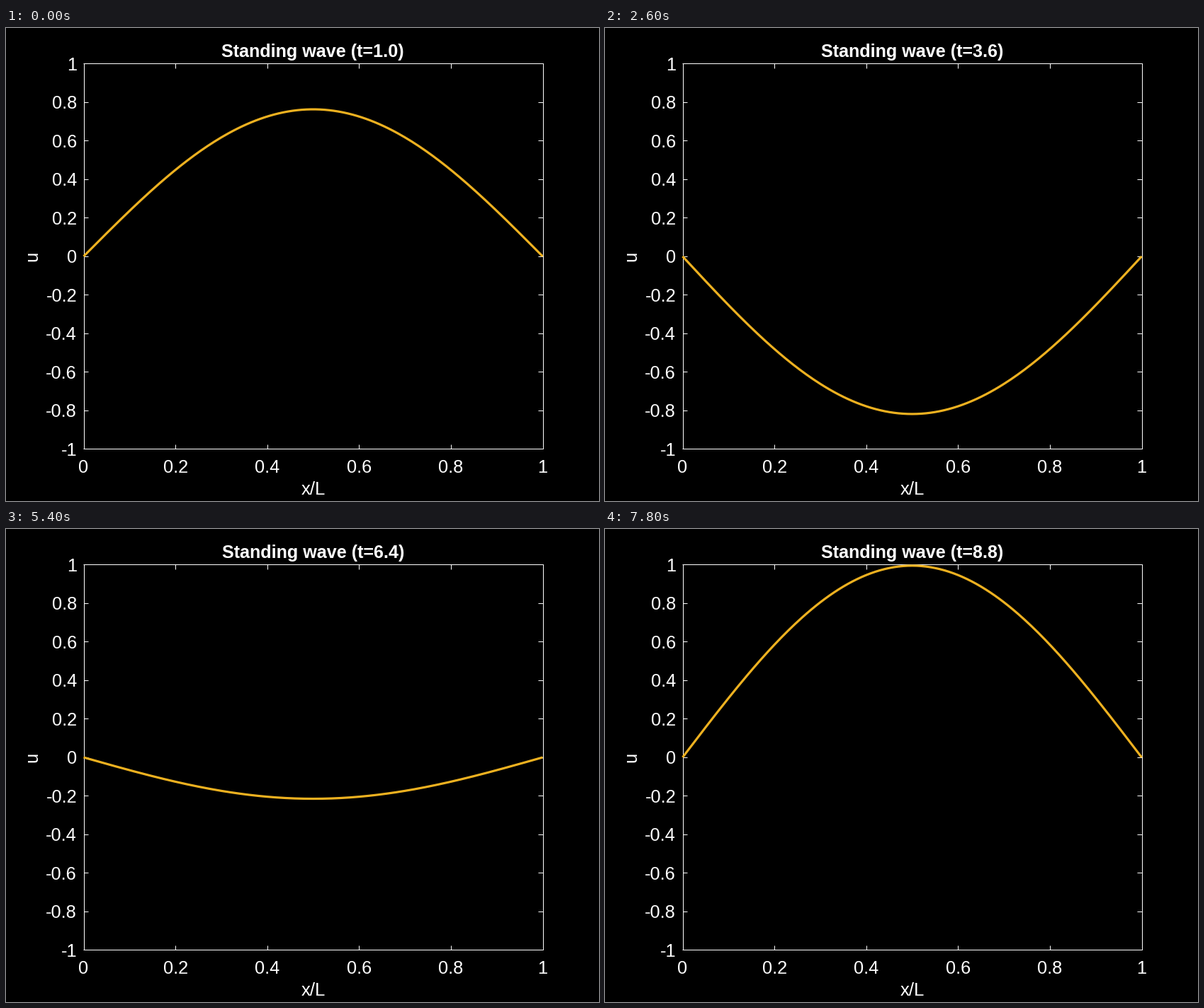
Write a matplotlib script that moves like this. It is 837 px wide and 669 px high and loops after 8 s.

```python
import numpy as np
import matplotlib.pyplot as plt
from matplotlib.animation import FuncAnimation

W, H, DPI = 837, 669, 100
PX = 72 / DPI                      # points per pixel
LEFT, RIGHT, TOP, BOTTOM = 109.5, 757.5, 50.5, 595.5
TICK = 6.5
FRAMES, STEP_MS = 40, 200
OMEGA = np.pi / np.sqrt(20)

plt.rcParams["font.family"] = "Liberation Sans"
plt.rcParams["toolbar"] = "None"

# The small surplus keeps the pixel size from being rounded down
fig = plt.figure(figsize=((W + 0.01) / DPI, (H + 0.01) / DPI), dpi=DPI,
                 facecolor="black")
ax = fig.add_axes([0, 0, 1, 1])
ax.set_xlim(0, W)
ax.set_ylim(H, 0)
ax.axis("off")


def to_x(v):
    return LEFT + v * (RIGHT - LEFT)


def to_y(u):
    return (TOP + BOTTOM) / 2 - u * (BOTTOM - TOP) / 2


def segment(xs, ys):
    ax.plot(xs, ys, color="white", lw=PX, solid_capstyle="butt", zorder=1)


def label(x, y, text, size=25.4, ha="center", **style):
    return ax.text(x, y, text, size=size * PX, color="white", ha=ha,
                   va="baseline", **style)


# Frame
for y in (TOP, BOTTOM):
    segment([LEFT - 0.5, RIGHT + 0.5], [y, y])
for x in (LEFT, RIGHT):
    segment([x, x], [TOP, BOTTOM])

# Ticks and their labels
for v in np.arange(6) / 5:
    x = to_x(v)
    segment([x, x], [TOP, TOP + TICK])
    segment([x, x], [BOTTOM, BOTTOM - TICK])
    label(x, 628.5, f"{v:g}")
for v in np.arange(-5, 6) / 5:
    y = to_y(v)
    segment([LEFT, LEFT + TICK], [y, y])
    segment([RIGHT, RIGHT - TICK], [y, y])
    label(100, y + 9, f"{v:g}", ha="right")

label(433.5, 660, "x/L", size=25.8)
label(44.5, 323, "u", size=25.8, rotation=90, rotation_mode="anchor")
title = label(433.3, 41, "", size=25.1, weight="bold")

s = np.linspace(0, 1, 201)
wave, = ax.plot([], [], color="#EDB120", lw=3.2 * PX, zorder=3,
                solid_capstyle="butt", solid_joinstyle="round")


def update(i):
    t = 1 + 0.2 * i
    wave.set_data(to_x(s), to_y(np.cos(OMEGA * t) * np.sin(np.pi * s)))
    title.set_text(f"Standing wave (t={t:.1f})")
    return wave, title


anim = FuncAnimation(fig, update, frames=FRAMES, interval=STEP_MS,
                     init_func=lambda: update(0), repeat=True, repeat_delay=0)
plt.show()
```
